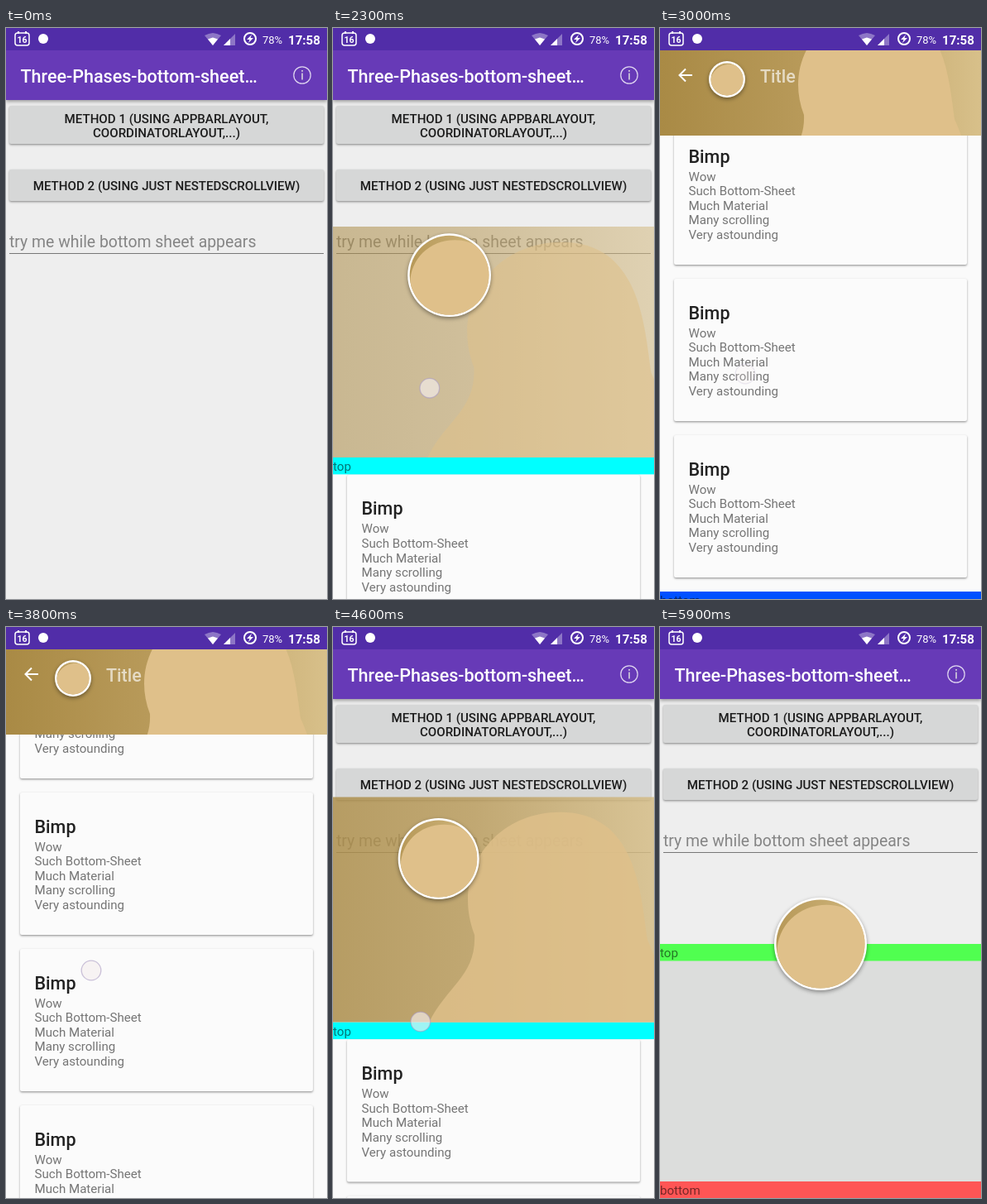
These frames come from a looping animation (388 by 690 pixels, 6400 ms). An HTML page with a canvas:

```html
<!DOCTYPE html>
<html lang="en">
<head>
<meta charset="utf-8">
<title>Bottom sheet</title>
<style>
html, body { margin: 0; width: 100%; height: 100%; overflow: hidden; background: #eee; }
canvas { display: block; width: 388px; height: 690px; }
</style>
</head>
<body>
<canvas id="stage" width="388" height="690"></canvas>
<script>
const c = document.getElementById('stage').getContext('2d');
const W = 388, LOOP = 6400, STEP = 100;
const PEEK_Y = 383, FULL_Y = 27, TRAVEL = PEEK_Y - FULL_Y;
const PEEK_H = 307, FULL_H = 237, COLLAPSE = 134;
const CARDS = 5, PITCH = 189;

// Drag distance: below 0 the sheet is entering, up to TRAVEL it rises,
// then the header collapses, then the list scrolls.
const DRAG = [[1400, -350], [1500, -230], [1600, -90], [1700, -20], [1800, 0], [1950, 0],
  [2000, 8], [2100, 45], [2300, 143], [2500, 315], [2600, 356], [2700, 400], [2800, 600],
  [3000, 905], [3100, 917], [3500, 917], [3700, 730], [3900, 530], [4100, 390],
  [4200, 356], [4400, 356], [4500, 285], [4700, 70], [4800, 8], [4900, 0]];
const IMAGE_ALPHA = [[1950, 0], [2000, .12], [2300, .56], [2600, 1], [4400, 1],
  [4700, .75], [4900, .5], [5000, 0]];
// start, end, x0, y0, x1, y1
const TOUCHES = [[1000, 1200, 131, 195, 131, 195], [2000, 2500, 124, 578, 112, 340],
  [2700, 3000, 108, 560, 103, 418], [3500, 3900, 100, 220, 104, 480],
  [4200, 4700, 97, 225, 108, 540]];

const clamp = v => Math.max(0, Math.min(1, v));
const mix = (a, b, k) => a + (b - a) * k;

function track(keys, t) {
  if (t <= keys[0][0]) return keys[0][1];
  for (let i = 1; i < keys.length; i++) {
    const [t0, a] = keys[i - 1], [t1, b] = keys[i];
    if (t < t1) return mix(a, b, (t - t0) / (t1 - t0));
  }
  return keys[keys.length - 1][1];
}

function rect(x, y, w, h, fill) {
  c.fillStyle = fill;
  c.fillRect(x, y, w, h);
}

function round(x, y, w, h, r) {
  c.beginPath();
  c.roundRect(x, y, w, h, r);
}

function disc(x, y, r) {
  c.beginPath();
  c.arc(x, y, r, 0, 7);
}

function poly(fill, ...p) {
  c.beginPath();
  for (let i = 0; i < p.length; i += 2) c.lineTo(p[i], p[i + 1]);
  c.fillStyle = fill;
  c.fill();
}

function text(s, x, y, size, fill, weight = 400, align = 'left') {
  c.font = `${weight} ${size}px Roboto, sans-serif`;
  c.textAlign = align;
  c.fillStyle = fill;
  c.fillText(s, x, y);
}

function shadow(blur, dy, color) {
  c.shadowBlur = blur;
  c.shadowOffsetY = dy;
  c.shadowColor = color;
}

function panel(x, y, w, h, fill) {
  c.save();
  shadow(2.5, 1.2, 'rgba(0,0,0,.4)');
  round(x, y, w, h, 2);
  c.fillStyle = fill;
  c.fill();
  c.restore();
}

function statusBar() {
  rect(0, 0, W, 27, '#512da8');
  c.strokeStyle = '#fff';
  c.lineWidth = 1.5;
  round(11, 6, 17, 15, 3);
  c.stroke();
  rect(14, 4, 2, 3, '#fff');
  rect(23, 4, 2, 3, '#fff');
  text('16', 19.5, 18, 10.5, '#fff', 700, 'center');
  disc(45, 13, 6);
  c.fill();
  poly('rgba(255,255,255,.35)', 240, 9, 245, 7, 250, 6, 255, 7, 260, 9, 250, 21);
  poly('#fff', 244, 13.5, 250, 11.5, 256, 13.5, 250, 21);
  poly('rgba(255,255,255,.35)', 277, 7, 277, 21, 263, 21);
  poly('#fff', 271, 13, 271, 21, 263, 21);
  c.lineWidth = 2;
  disc(295, 13, 7);
  c.stroke();
  poly('#fff', 297, 8, 291, 14, 294.5, 14, 293, 18, 299, 12, 295.5, 12);
  text('78%', 310, 19, 13, '#fff');
  text('17:58', 341, 19.5, 15.1, '#fff', 700);
}

function ripple(t) {
  if (t < 1200 || t > 1600) return;
  const k = (t - 1200) / 200;
  c.save();
  round(4, 171, 380, 38, 2);
  c.clip();
  c.globalAlpha = k > 1 ? .08 * (2.4 - k) / 1.4 : .08;
  disc(mix(131, 147, Math.min(k, 1)), 190, 14 + 34 * k * k);
  c.fillStyle = '#000';
  c.fill();
  c.restore();
}

function home(t) {
  rect(0, 0, W, 690, '#eee');
  c.save();
  shadow(4, 1.5, 'rgba(0,0,0,.35)');
  rect(0, 27, W, 60, '#673ab7');
  c.restore();
  text('Three-Phases-bottom-sheet…', 17.5, 65.5, 21.56, '#fff', 500);
  c.strokeStyle = 'rgba(255,255,255,.8)';
  c.lineWidth = 1.2;
  disc(358, 57, 10.2);
  c.stroke();
  rect(357.3, 54.5, 1.5, 8, '#ddd');
  rect(357.2, 51, 1.7, 1.7, '#ddd');

  panel(4, 94, 380, 46, '#d6d7d7');
  panel(4, 171, 380, 38, '#d6d7d7');
  ripple(t);
  const label = (s, y) => text(s, 194, y, 15.1, '#1c1c1c', 500, 'center');
  label('METHOD 1 (USING APPBARLAYOUT,', 114.5);
  label('COORDINATORLAYOUT,...)', 132);
  label('METHOD 2 (USING JUST NESTEDSCROLLVIEW)', 196);
  text('try me while bottom sheet appears', 4, 265, 19.4, '#858585');
  rect(4, 272, 380, 1, '#777');
}

function bar(s, y, fill) {
  rect(0, y, W, 20.5, fill);
  text(s, 0, y + 16, 15.1, 'rgba(0,0,0,.54)');
}

// Photo in its tones: warm backdrop with one plain rounded shape.
function photo(x, y, scale) {
  c.save();
  c.translate(x, y);
  c.scale(scale, scale);
  const g = c.createLinearGradient(-194, 0, 194, 0);
  g.addColorStop(0, '#a98a45');
  g.addColorStop(.45, '#b89a5a');
  g.addColorStop(1, '#d8c08a');
  rect(-200, -4, 400, 246, g);
  c.beginPath();
  c.moveTo(-70, 242);
  c.bezierCurveTo(-52, 200, -18, 190, -20, 145);
  c.bezierCurveTo(-45, 80, 0, 16, 70, 16);
  c.bezierCurveTo(150, 16, 155, 100, 162, 150);
  c.quadraticCurveTo(180, 190, 188, 242);
  c.fillStyle = '#dfc08a';
  c.fill();
  c.restore();
}

function list(y, scroll) {
  rect(0, y, W, 690 - y, '#fafafa');
  const top = y - scroll;
  bar('top', top, '#0ff');
  for (let i = 0; i < CARDS; i++) {
    const cy = top + 21 + i * PITCH;
    if (cy > 700 || cy < -180) continue;
    panel(17, cy, 354, 172, '#fbfbfb');
    text('Bimp', 34.5, cy + 48.5, 21.56, '#212121', 500);
    ['Wow', 'Such Bottom-Sheet', 'Much Material', 'Many scrolling', 'Very astounding']
      .forEach((s, n) => text(s, 34.5, cy + 70.5 + n * 17.65, 15.1, '#757575'));
  }
  bar('bottom', top + 21 + CARDS * PITCH, '#0050ff');
}

function header(y, h, fold, alpha) {
  c.save();
  c.globalAlpha = alpha;
  c.beginPath();
  c.rect(0, y, W, h - fold * COLLAPSE);
  c.clip();
  photo(194, y - fold * COLLAPSE / 2, h / FULL_H);
  c.restore();
}

function avatar(x, y, r) {
  c.save();
  shadow(5, 2, 'rgba(0,0,0,.4)');
  disc(x, y, r + 1);
  c.fillStyle = '#fff';
  c.fill();
  c.restore();
  c.save();
  disc(x, y, r - 1.5);
  c.clip();
  photo(x - r * .65, y - r * 1.04, r * .0113);
  c.restore();
}

function titleBar(fold, alpha) {
  c.save();
  c.globalAlpha = alpha;
  c.strokeStyle = '#fff';
  c.lineWidth = 2;
  c.beginPath();
  c.moveTo(39, 57);
  c.lineTo(24, 57);
  c.moveTo(31, 49.5);
  c.lineTo(23.5, 57);
  c.lineTo(31, 64.5);
  c.stroke();
  text('Title', mix(130, 121, fold), mix(199.5, 65.5, fold), mix(32, 21.56, fold),
    `rgba(255,255,255,${mix(1, .65, fold)})`, 500);
  c.restore();
}

function sheet(t) {
  const drag = t >= 1500 ? track(DRAG, t) : -350;
  if (drag <= -350) return;
  const rise = clamp(drag / TRAVEL);
  const fold = clamp((drag - TRAVEL) / COLLAPSE);
  const scroll = Math.max(0, drag - TRAVEL - COLLAPSE);
  const y = Math.max(FULL_Y, PEEK_Y - drag);
  const h = mix(PEEK_H, FULL_H, rise);

  c.save();
  c.globalAlpha = clamp(1 - rise * 6);
  rect(0, y, W, PEEK_H, '#dcdddc');
  bar('top', y, '#50ff50');
  bar('bottom', y + 287, '#ff5555');
  c.restore();

  if (rise > 0) list(y + h - fold * COLLAPSE, scroll);
  header(y, h, fold, track(IMAGE_ALPHA, t));
  avatar(
    mix(mix(194, 61, rise), 81, fold),
    mix(y + 160 * rise ** 1.1, 62, fold),
    mix(55 - 14 * rise, 21, fold));
  titleBar(fold, clamp((rise - .85) / .15));
}

function touch(t) {
  for (const [start, end, x0, y0, x1, y1] of TOUCHES) {
    if (t < start || t > end) continue;
    const k = (t - start) / (end - start);
    c.save();
    c.globalAlpha = t === end ? .35 : 1;
    disc(mix(x0, x1, k), mix(y0, y1, k), 11.8);
    c.fillStyle = 'rgba(245,238,238,.65)';
    c.fill();
    c.strokeStyle = 'rgba(170,155,195,.6)';
    c.lineWidth = 1.3;
    c.stroke();
    c.restore();
  }
}

function frame(now) {
  const t = Math.floor(now % LOOP / STEP) * STEP;
  c.clearRect(0, 0, W, 690);
  home(t);
  sheet(t);
  statusBar();
  touch(t);
  requestAnimationFrame(() => frame(performance.now() - origin));
}

const origin = performance.now();
frame(0);
</script>
</body>
</html>
```
